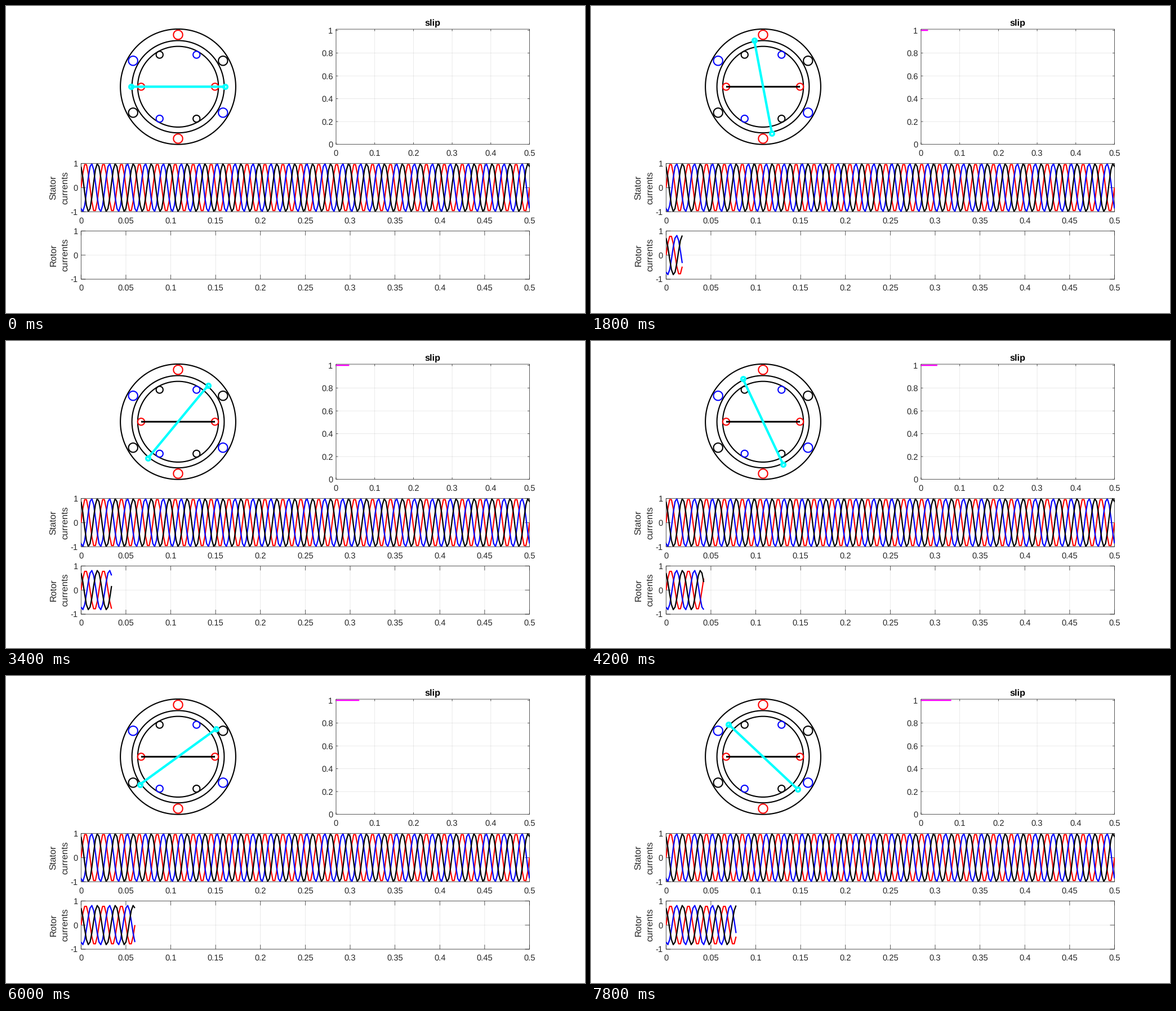
Animation, 1028 px wide and 545 px high, one loop 8000 ms. Source, as a matplotlib script:

```python
import numpy as np
import matplotlib.pyplot as plt
from matplotlib.animation import FuncAnimation
from matplotlib.patches import Rectangle

W, H, DPI = 1028, 545, 64
PX = 72 / DPI                      # points per pixel
FRAMES, INTERVAL = 40, 200
STEP = 0.002                       # simulated seconds per frame
INK = "#262626"
PHASES = [("red", 0), ("blue", -2 * np.pi / 3), ("black", 2 * np.pi / 3)]

plt.rcParams["font.family"] = "Liberation Sans"
plt.rcParams["text.hinting"] = "none"
fig = plt.figure(figsize=(W / DPI, H / DPI), dpi=DPI, facecolor="white")
ax = fig.add_axes([0, 0, 1, 1])
ax.set(xlim=(0, W), ylim=(H, 0))
ax.axis("off")


def line(x, y, color, width, z=3, **kw):
    return ax.plot(x, y, color=color, lw=width * PX, zorder=z, snap=False,
                   solid_capstyle="butt", solid_joinstyle="round", **kw)[0]


def label(x, y, text, size=14.8, color=INK, **kw):
    ax.text(x, y, text, fontsize=size * PX, color=color, va="baseline", **kw)


class Panel:
    """A boxed plot area with grid, inward ticks and tick labels."""

    def __init__(self, left, top, right, bottom, ylim, xticks, yticks):
        self.left, self.top, self.right, self.bottom = left, top, right, bottom
        self.ylim = ylim
        self.clip = Rectangle((left, top), right - left, bottom - top,
                              transform=ax.transData)
        tick = 0.01 * (right - left)
        for v in xticks:
            x = self.x(v)
            line([x, x], [top, bottom], INK, 0.74, 1, alpha=0.13)
            line([x, x], [bottom, bottom - tick], INK, 0.74, 2)
            line([x, x], [top, top + tick], INK, 0.74, 2)
            label(x, bottom + 20.2, f"{v:g}", ha="center")
        for v in yticks:
            y = self.y(v)
            line([left, right], [y, y], INK, 0.74, 1, alpha=0.13)
            line([left, left + tick], [y, y], INK, 0.74, 2)
            line([right, right - tick], [y, y], INK, 0.74, 2)
            label(left - 5.5, y + 5.4, f"{v:g}", ha="right")
        line([left, right, right, left, left],
             [top, top, bottom, bottom, top], INK, 0.74, 2)

    def x(self, t):
        return self.left + np.asarray(t) / 0.5 * (self.right - self.left)

    def y(self, v):
        lo, hi = self.ylim
        return self.bottom - (np.asarray(v) - lo) / (hi - lo) * (self.bottom - self.top)

    def curve(self, t, v, color, width):
        curve = line(self.x(t), self.y(v), color, width)
        curve.set_clip_path(self.clip)
        return curve


def name_panel(panel, first):
    mid = (panel.top + panel.bottom) / 2
    for x, text in [(88.5, first), (109.3, "currents")]:
        label(x, mid, text, 16.3, ha="center", rotation=90, rotation_mode="anchor")


# Plot panels
LEFT, RIGHT = 133.3, 929.5
fine = np.arange(11) * 0.05
slip = Panel(586, 41.1, RIGHT, 245.6, (0, 1.01), np.arange(6) / 10, np.arange(6) / 5)
stator = Panel(LEFT, 279.5, RIGHT, 365.2, (-1, 1), fine, [-1, 0, 1])
rotor = Panel(LEFT, 399.3, RIGHT, 485, (-1, 1), fine, [-1, 0, 1])
label((slip.left + RIGHT) / 2, 34.4, "slip", 16.3, "black", ha="center", weight="bold")
name_panel(stator, "Stator")
name_panel(rotor, "Rotor")


def current(t, phase):
    return np.sin(2 * np.pi * 50 * t + phase)


time = np.arange(251) * STEP
for color, phase in PHASES:
    stator.curve(time, current(time, phase), color, 2.2)
rotor_curves = [rotor.curve([], [], color, 2.2) for color, _ in PHASES]
slip_curve = slip.curve([], [], "magenta", 2.4)

# Machine cross-section
CX, CY, R = 305.5, 143.3, 102.4


def polar(radius, angle):
    return CX + R * radius * np.cos(angle), CY - R * radius * np.sin(angle)


def circle(x, y, radius, color):
    a = np.linspace(0, 2 * np.pi, 181)
    line(x + R * radius * np.cos(a), y + R * radius * np.sin(a), color, 2.1)


def coils(distance, radius, start, colors):
    for i in range(6):
        x, y = polar(distance, np.radians(start + 60 * i))
        circle(x, y, radius, colors[i % 3])


for radius in (1, 0.8, 0.7):
    circle(CX, CY, radius, "black")
coils(0.9, 0.08, 30, ["black", "red", "blue"])
coils(0.64, 0.06, 0, ["red", "blue", "black"])
line([CX - 0.64 * R, CX + 0.64 * R], [CY, CY], "black", 3, 4)
field = line([], [], "cyan", 4.2, 5, marker="o", markersize=7.4 * PX,
             markerfacecolor="none", markeredgewidth=3.7 * PX)


def draw(k):
    t = time[:k + 1]
    for curve, (_, phase) in zip(rotor_curves, PHASES):
        curve.set_data(rotor.x(t), rotor.y(0.815 * current(t, phase)))
    slip_curve.set_data(slip.x(t), slip.y(np.ones_like(t)))
    angle = -np.radians(28.8 * k)
    field.set_data(*polar(0.82, np.array([angle, angle + np.pi])))
    return [*rotor_curves, slip_curve, field]


anim = FuncAnimation(fig, draw, frames=FRAMES, interval=INTERVAL,
                     repeat=True, repeat_delay=0)
plt.show()
```
